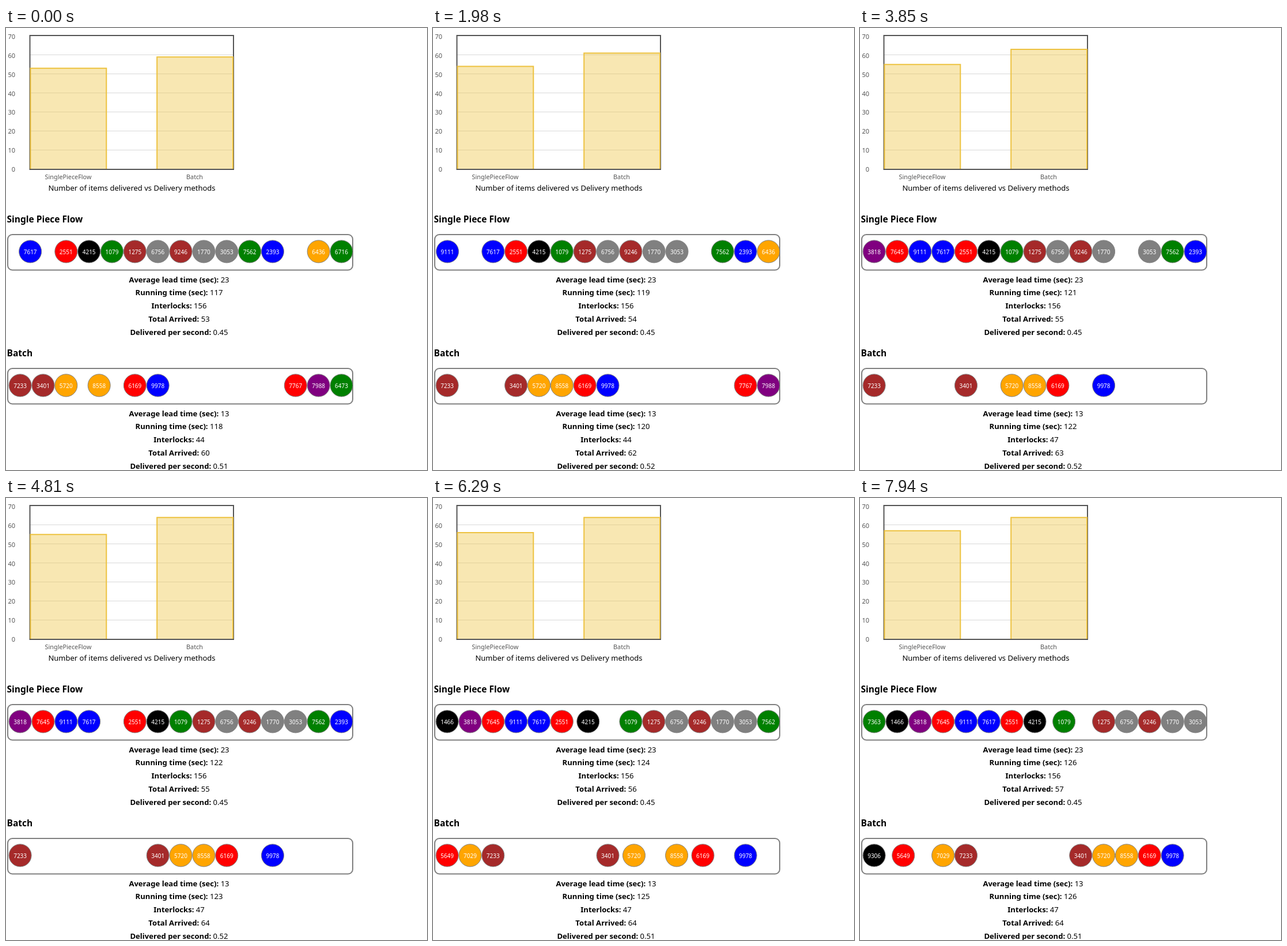
Animation of 731x766 px, one loop 7990 ms. Source, as an HTML page with a canvas:

```html
<!DOCTYPE html>
<html lang="en">
<head>
<meta charset="utf-8">
<title>Single piece flow and batch</title>
<style>
html, body { margin: 0; width: 100%; height: 100%; overflow: hidden; background: #fff; }
canvas { display: block; }
</style>
</head>
<body>
<canvas id="stage" width="731" height="766"></canvas>
<script>
const ctx = document.getElementById('stage').getContext('2d');
const LOOP = 7990;
const FONT = '"Noto Sans", "Open Sans", sans-serif';
const LAST_SLOT = 14;

// Key points of the clock: [ms, screen refresh, conveyor tick]
const clock = [
  [0, .4, .44], [160, 1, 1], [870, 4, 4], [1030, 4.65, 4.67], [2810, 12, 12],
  [3850, 16, 16], [4810, 20, 20], [6290, 26, 26.14], [7940, 33, 33.27], [8180, 34, 34]
];

const clamp = v => Math.max(0, Math.min(1, v));
const count = (start, times, t) => start + times.filter(at => t >= at).length;

function lookUp(value, from, to) {
  const i = Math.max(1, clock.findIndex(point => point[from] > value));
  const a = clock[i - 1], b = clock[i];
  return a[to] + (b[to] - a[to]) * clamp((value - a[from]) / (b[from] - a[from]));
}

// The screen rests for the first part of each refresh period
function tickAt(t) {
  const refresh = lookUp(t, 0, 1);
  return lookUp(refresh % 1 < .6 ? Math.floor(refresh) : refresh, 1, 2);
}

// Balls one slot apart, front ball first; order sets how late a wave reaches each
const queue = (slot, order, names) => names.split(', ').map((name, i) => {
  const [label, color] = name.split(' ');
  return { label, color, slot: slot - i, order: order + i };
});

// Each wave moves every ball one slot forward, passing from front to back
const single = {
  title: 'Single Piece Flow',
  top: 357,
  waves: [-6.2, 1.2, 7, 14.2, 21.3, 29],
  lag: .64,
  balls: [
    ...queue(13, 0, '6716 green'),
    ...queue(11, -2, '6436 orange'),
    ...queue(10, 0, '2393 blue, 7562 green, 3053 gray, 1770 gray, 9246 brown, 6756 gray, ' +
      '1275 brown, 1079 green, 4215 black, 2551 red, 7617 blue, 9111 blue, 7645 red, ' +
      '3818 purple, 1466 black, 7363 green')
  ],
  leadTime: 23,
  seconds: t => Math.floor(117.985 + 1.01 * t / 1000),
  interlocks: () => 156,
  total: t => count(53, [160, 2250, 6000, 7000], t)
};
const batch = {
  title: 'Batch',
  top: 589,
  waves: [-1.6, 3.2, 10.2, 11.9, 15.5, 19.5, 23.2, 25.9],
  lag: 1.04,
  balls: [
    ...queue(13, -1.8, '6473 green, 7988 purple, 7767 red'),
    ...queue(5, 0, '9978 blue, 6169 red, 8558 orange, 5720 orange, 3401 brown'),
    ...queue(-4, 5, '7233 brown, 7029 orange, 5649 red, 9306 black')
  ],
  leadTime: 13,
  seconds: t => Math.floor(118.4 + 1.05 * t / 1000),
  interlocks: t => t < 2580 ? 44 : 47,
  total: t => count(59, [-300, 600, 1850, 2580, 4080], t)
};

function text(str, x, y, size, color = '#000', align = 'left', weight = 400) {
  ctx.font = `${weight} ${size}px ${FONT}`;
  ctx.fillStyle = color;
  ctx.textAlign = align;
  ctx.fillText(str, x, y);
}

function line(color, width, ...points) {
  ctx.strokeStyle = color;
  ctx.lineWidth = width;
  ctx.beginPath();
  points.forEach(([x, y]) => ctx.lineTo(x, y));
  ctx.stroke();
}

const valueY = v => 244 - v * 230 / 70;

function drawBar(x, value) {
  const y = valueY(value), right = x + 131.8;
  ctx.fillStyle = 'rgba(237,194,64,.4)';
  ctx.fillRect(x, y, 131.8, 244 - y);
  line('#edc240', 2, [x, 244], [x, y], [right, y], [right, 244]);
}

function drawChart(t) {
  for (let v = 0; v <= 70; v += 10) {
    const y = Math.floor(valueY(v)) + .5;
    if (v % 70) line('rgba(84,84,84,.22)', 1, [42, y], [394, y]);
    text(v, 16, valueY(v) + 5, 11, '#545454', 'right');
  }
  ctx.strokeStyle = '#545454';
  ctx.lineWidth = 2;
  ctx.strokeRect(41.5, 13, 353.5, 232);
  // The chart reads the totals about once a second
  const readAt = 340 + 980 * Math.floor((t - 340) / 980);
  drawBar(42.5, single.total(readAt));
  drawBar(262.2, batch.total(readAt));
  text('SinglePieceFlow', 108, 262, 10.8, '#545454', 'center');
  text('Batch', 327.5, 262, 10.8, '#545454', 'center');
  text('Number of items delivered vs Delivery methods', 218.5, 281.5, 13, '#000', 'center');
}

function drawBall({ label, color }, slot, y) {
  const x = 24.6 + 39.85 * Math.max(0, slot);
  ctx.beginPath();
  ctx.arc(x, y, 19.5, 0, Math.PI * 2);
  ctx.fillStyle = color;
  ctx.fill();
  ctx.strokeStyle = 'gray';
  ctx.lineWidth = 1;
  ctx.stroke();
  text(label, x, y + 4.3, 10, '#fff', 'center');
}

function drawStat(label, value, y) {
  const size = 13.1;
  ctx.font = `700 ${size}px ${FONT}`;
  const bold = ctx.measureText(label + ':').width;
  ctx.font = `400 ${size}px ${FONT}`;
  const x = 300.5 - (bold + ctx.measureText(' ' + value).width) / 2;
  text(label + ':', x, y, size, '#000', 'left', 700);
  text(' ' + value, x + bold, y, size);
}

function drawLane(lane, t, tick) {
  const { title, top, waves, lag, balls } = lane;
  text(title, 1.5, top - 20.5, 15.5, '#000', 'left', 700);
  ctx.strokeStyle = 'gray';
  ctx.lineWidth = 2;
  ctx.beginPath();
  ctx.roundRect(3, top + 1, 599, 61.5, 8);
  ctx.stroke();

  const slots = balls.map(({ slot, order }) => waves.reduce(
    (pos, wave) => pos + clamp(tick - Math.floor(wave + lag * order)), slot));
  balls.forEach((ball, i) => {
    const entered = i === 0 || slots[i - 1] >= 1;
    if (entered && slots[i] <= LAST_SLOT) drawBall(ball, slots[i], top + 30.4);
  });

  const seconds = lane.seconds(t), total = lane.total(t);
  Object.entries({
    'Average lead time (sec)': lane.leadTime,
    'Running time (sec)': seconds,
    'Interlocks': lane.interlocks(t),
    'Total Arrived': total,
    'Delivered per second': (total / seconds).toFixed(2)
  }).forEach(([label, value], i) => drawStat(label, value, top + 83.7 + 22.7 * i));
}

function draw(now) {
  const t = now % LOOP, tick = tickAt(t);
  ctx.fillStyle = '#fff';
  ctx.fillRect(0, 0, 731, 766);
  drawChart(t);
  drawLane(single, t, tick);
  drawLane(batch, t, tick);
}

const start = performance.now();
(function loop() {
  draw(performance.now() - start);
  requestAnimationFrame(loop);
})();
</script>
</body>
</html>
```
